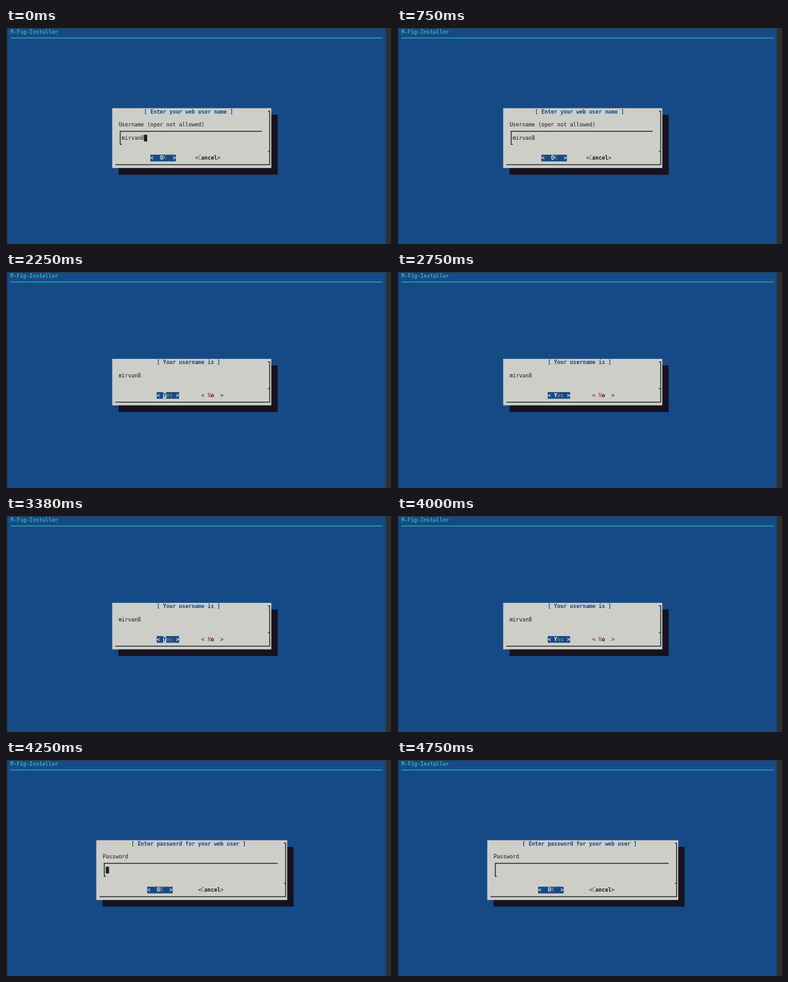
Recreate the animation shown at these times as an HTML page with a canvas. Size 600 by 338 pixels, loop 5380 ms.

```html
<!DOCTYPE html>
<html lang="en">
<head>
<meta charset="utf-8">
<title>Terminal setup dialog</title>
<style>
html, body { margin: 0; width: 100%; height: 100%; overflow: hidden; background: #154a86; }
canvas { display: block; width: 600px; height: 338px; }
</style>
</head>
<body>
<canvas id="stage"></canvas>
<script>
const LOOP = 5380;
const CW = 4.96, CH = 10.4, X0 = 1.8, Y0 = 0.7;
const FONT = '8.24px "DejaVu Sans Mono", "Noto Sans Mono", monospace';
const C = {
  blue: '#154a86', panel: '#cdcec7', ink: '#1b1820', shadow: '#16121f',
  teal: '#2bb0ac', title: '#12478c', red: '#cb3048', white: '#eceeea',
  tan: '#a39a78', edge: '#30302e', left: '#1d1a26'
};
const USER = 'mirvan8';

const canvas = document.getElementById('stage');
const ctx = canvas.getContext('2d');
const dpr = window.devicePixelRatio || 1;
canvas.width = 600 * dpr;
canvas.height = 338 * dpr;
ctx.scale(dpr, dpr);

const px = col => X0 + col * CW;
const py = row => Y0 + row * CH;

function rect(x, y, w, h, color) {
  ctx.fillStyle = color;
  ctx.fillRect(x, y, w, h);
}

function cells(col, row, cols, rows, color) {
  rect(px(col), py(row), cols * CW, rows * CH, color);
}

function text(str, col, row, color = C.ink, bold = false) {
  ctx.font = (bold ? 'bold ' : '') + FONT;
  ctx.fillStyle = color;
  ctx.fillText(str, px(col), py(row) + 8.1);
}

function line(color, ...points) {
  ctx.strokeStyle = color;
  ctx.lineWidth = 1.25;
  ctx.beginPath();
  points.forEach(([x, y]) => ctx.lineTo(x, y));
  ctx.stroke();
}

function desktop() {
  rect(0, 0, 600, 338, C.edge);
  rect(0, 0, X0, 338, C.left);
  rect(X0, Y0, 590, 338, C.blue);
  text('M-Fig-Installer', 1, 0, C.teal, true);
  line(C.teal, [px(1), 15.6], [px(118), 15.6]);
}

function panel(col, row, cols, rows, title, titleCol) {
  cells(col + 2, row + 1, cols, rows, C.shadow);
  cells(col, row, cols, rows, C.panel);
  const x = px(col + cols) - 2.6;
  const top = py(row) + 4.7;
  const bottom = py(row + rows) - 5.2;
  const tick = py(row + rows - 3) + 5;
  line(C.ink, [x - 2.6, top], [x, top], [x, bottom], [px(col + 1), bottom]);
  line(C.ink, [x - 2.6, tick], [x, tick]);
  text(title, titleCol, row, C.title, true);
}

function activeButton(label, col, row, keyAt) {
  cells(col, row, label.length, 1, C.blue);
  text('<', col, row, C.white, true);
  text(label[keyAt], col + keyAt, row, C.white, true);
  text(label.slice(keyAt + 1, -1), col + keyAt + 1, row, C.tan);
  text('>', col + label.length - 1, row, C.white, true);
}

function plainButton(label, col, row, keyAt) {
  text('<', col, row);
  text(label[keyAt], col + keyAt, row, C.red);
  text(label.slice(keyAt + 1, -1), col + keyAt + 1, row, C.ink, true);
  text('>', col + label.length - 1, row);
}

function inputDialog(d, cursor) {
  panel(d.col, 12, d.cols, 9, d.title, d.titleCol);
  text(d.label, d.col + 2, 14);
  const x = px(d.col + 2) + 2.6;
  line(C.ink, [px(d.col + d.cols - 3), 161.5], [x, 161.5], [x, 182.2], [x + 2.4, 182.2]);
  text(d.value, d.col + 3, 16);
  if (cursor) cells(d.col + 3 + d.value.length, 16, 1, 1, C.ink);
  activeButton('<  OK  >', d.ok, 19, 3);
  plainButton('<Cancel>', d.cancel, 19, 1);
}

function confirmDialog(cursor) {
  panel(33, 13, 50, 7, '[ Your username is ]', 47);
  text(USER, 35, 15);
  activeButton('< Yes >', 47, 18, 2);
  if (cursor) {
    cells(49, 18, 1, 1, C.panel);
    text('Y', 49, 18, C.blue, true);
  }
  plainButton('< No  >', 61, 18, 2);
}

const nameDialog = {
  col: 33, cols: 50, title: '[ Enter your web user name ]', titleCol: 43,
  label: 'Username (oper not allowed)', value: USER, ok: 45, cancel: 59
};
const passDialog = {
  col: 28, cols: 60, title: '[ Enter password for your web user ]', titleCol: 39,
  label: 'Password', value: '', ok: 44, cancel: 60
};

// The cursor toggles at each of these times, starting visible.
const BLINKS = [500, 1130, 1750, 2250, 2750, 3380, 4000, 4130, 4750];

function draw(t) {
  const cursor = BLINKS.filter(b => t >= b).length % 2 === 0;
  desktop();
  if (t < 2250) inputDialog(nameDialog, cursor);
  else if (t < 4250) confirmDialog(cursor);
  else inputDialog(passDialog, cursor);
}

const start = performance.now();
function tick() {
  draw((performance.now() - start) % LOOP);
  requestAnimationFrame(tick);
}
tick();
</script>
</body>
</html>
```
